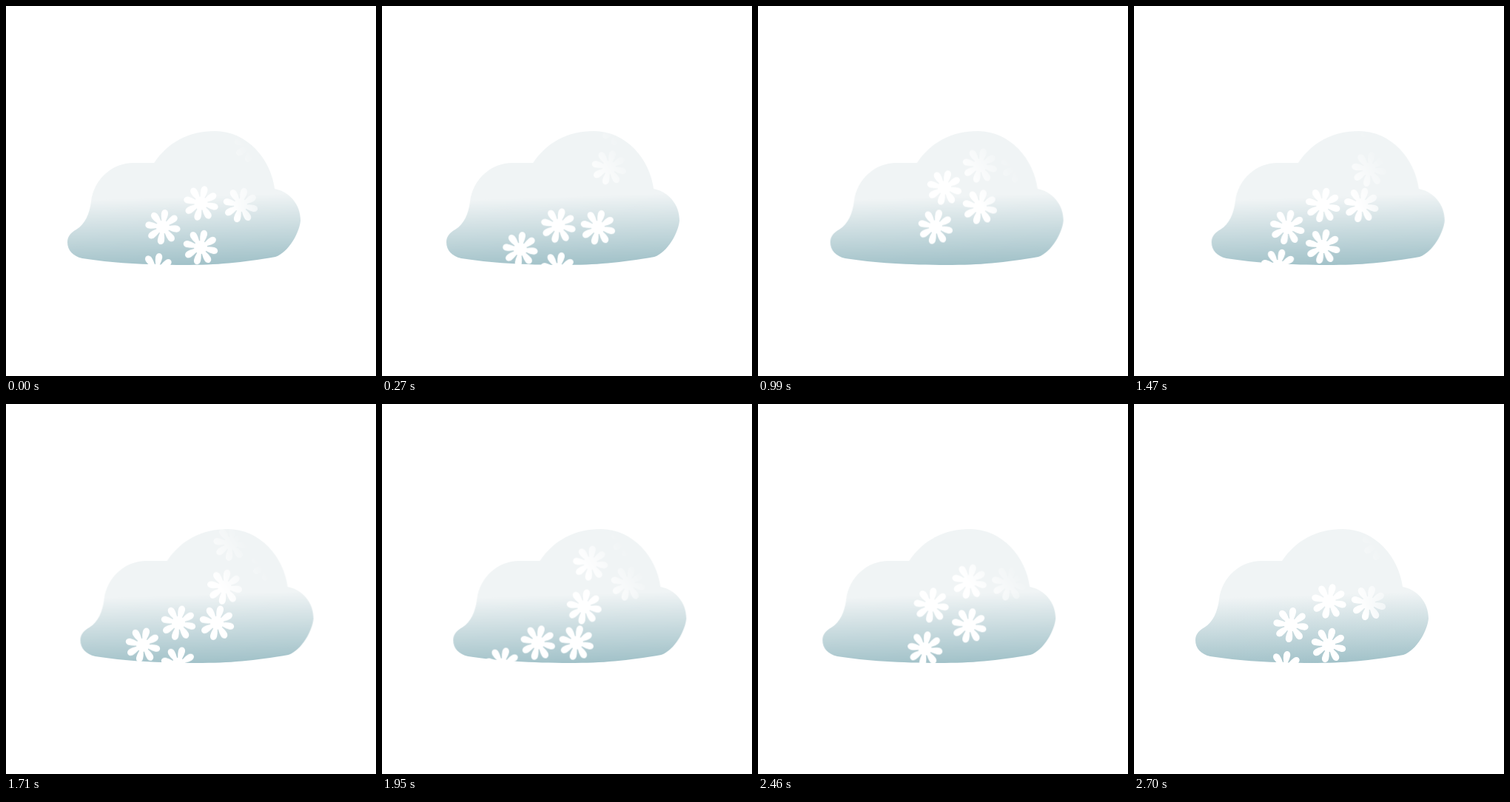
Animation of 500x500 px, one loop 2.73 s. Source, as an HTML page without scripts:

```html
<!DOCTYPE html>
<html lang="en">
<head>
<meta charset="utf-8">
<title>Snow cloud</title>
<style>
  html, body { margin: 0; width: 100%; height: 100%; overflow: hidden; background: #fff; }
  svg { display: block; width: 100%; height: 100%; }
  .cloud { animation: sway 2730ms linear infinite; }
  .snow { animation: fall 2730ms linear infinite; }
  @keyframes sway {
    53.85% { transform: translateX(21.8px); }
    98.9%, 100% { transform: none; }
  }
  @keyframes fall {
    98.9%, 100% { transform: translate(-251px, 301px); }
  }
</style>
</head>
<body>
<svg viewBox="0 0 500 500">
  <defs>
    <linearGradient id="shade" gradientUnits="userSpaceOnUse" x1="238" y1="258" x2="241" y2="350">
      <stop stop-color="#f0f4f5"/>
      <stop offset="1" stop-color="#a2c2c9"/>
    </linearGradient>
    <linearGradient id="fade" gradientUnits="userSpaceOnUse" x1="300" y1="268.6" x2="355.7" y2="229.6">
      <stop stop-color="#fff"/>
      <stop offset="1" stop-color="#fff" stop-opacity="0"/>
    </linearGradient>
    <mask id="appear" maskUnits="userSpaceOnUse" x="0" y="0" width="500" height="500">
      <rect width="500" height="500" fill="url(#fade)"/>
    </mask>
    <path id="petal" d="M0 0C-2.5 -7 -4.6 -13 -4.6 -18C-4.6 -21.5 -2.5 -23.8 0 -23.8S4.6 -21.5 4.6 -18C4.6 -13 2.5 -7 0 0"/>
    <g id="pair">
      <use href="#petal"/>
      <use href="#petal" transform="rotate(45)"/>
    </g>
    <g id="flake" transform="rotate(14)">
      <circle r="9"/>
      <use href="#pair"/>
      <use href="#pair" transform="rotate(90)"/>
      <use href="#pair" transform="rotate(180)"/>
      <use href="#pair" transform="rotate(270)"/>
    </g>
    <g id="flurry">
      <use href="#flake" x="263.5" y="266.5"/>
      <use href="#flake" x="317" y="269"/>
      <use href="#flake" transform="translate(212 298.5) rotate(-6)"/>
      <use href="#flake" x="263" y="326"/>
      <use href="#flake" transform="translate(203.5 357.5) rotate(-4)"/>
      <use href="#flake" x="332" y="188"/>
      <use href="#flake" x="344" y="135"/>
      <use href="#flake" x="392" y="161"/>
      <use href="#flake" x="392" y="105"/>
      <use href="#flake" x="444" y="105"/>
    </g>
  </defs>
  <path class="cloud" fill="url(#shade)" d="M200 212C219 184 247 169 282 169C326 169 358 207 363 247
    C383 251 398 268 398 290C396.5 306 382 333 364 339C318 347 285 350 240 350
    C190 350 140 347 103 341C90 338 83 330 83 319C83 311 88 306 95 302
    C107 295 113 280 115 264C119 233 144 212 172 212Z"/>
  <g mask="url(#appear)" fill="#fff">
    <g class="snow">
      <use href="#flurry"/>
      <use href="#flurry" x="251" y="-301"/>
    </g>
  </g>
</svg>
</body>
</html>
```
